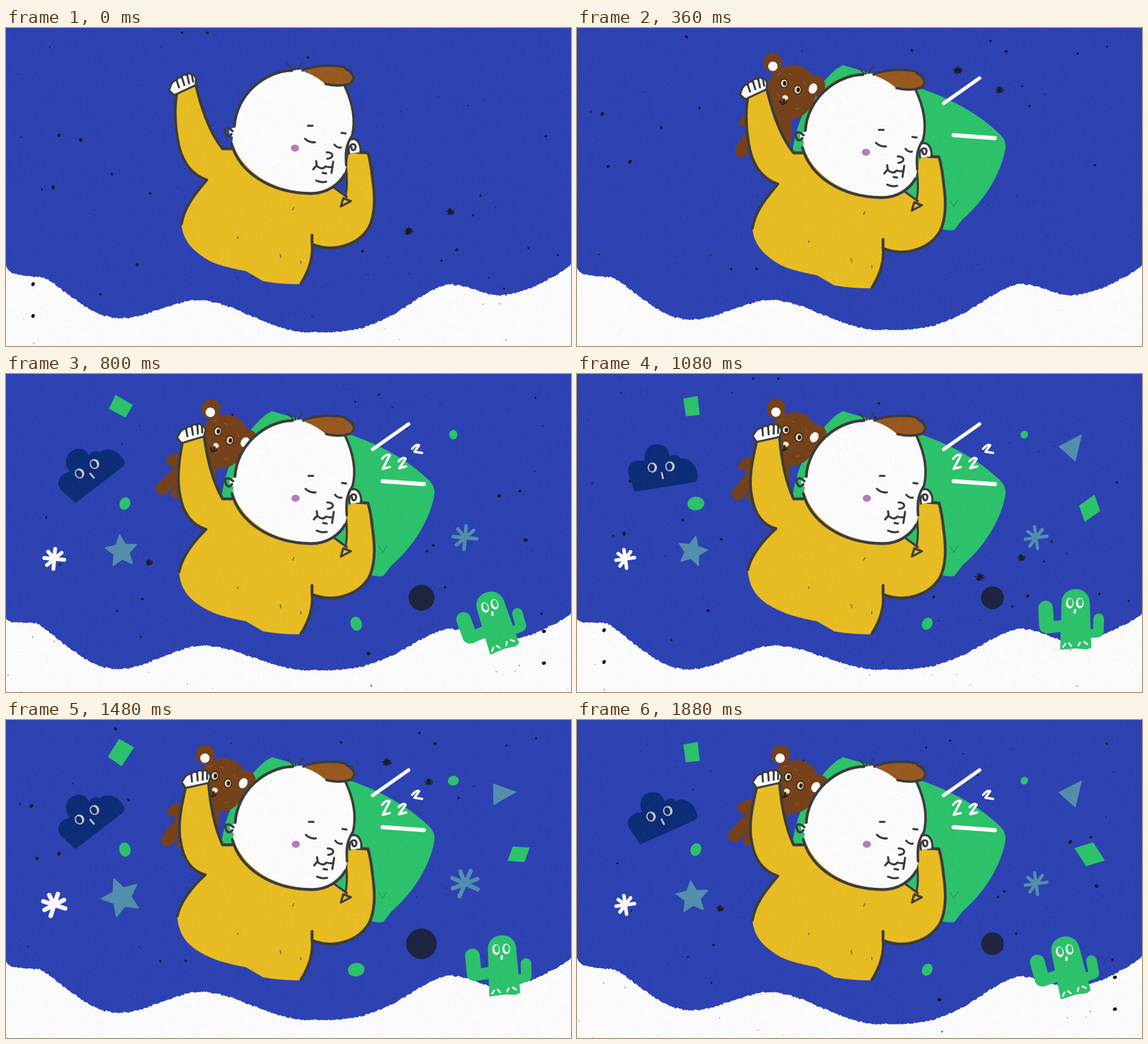
These frames come from a looping animation (960x540 px, 1.92 s). An HTML page with a canvas:

```html
<!DOCTYPE html>
<html lang="en">
<head>
<meta charset="utf-8">
<title>Sleeping baby</title>
<style>
html, body { margin: 0; width: 960px; height: 540px; overflow: hidden; background: #2d42b3; }
canvas { display: block; }
</style>
</head>
<body>
<canvas id="stage" width="960" height="540"></canvas>
<script>
const ctx = document.getElementById('stage').getContext('2d');
const LOOP = 1920, STEP = 40, TAU = Math.PI * 2;
const BLUE = '#2d42b3', WHITE = '#fcfcfc', INK = '#3b3c3b', YELLOW = '#e9bd22', GREEN = '#2cc36b',
  BROWN = '#75411a', HAIR = '#99591f', STEEL = '#538fad', NAVY = '#0c2c78', DARK = '#1d2340', CREAM = '#d0cac8';

const clamp = u => Math.min(1, Math.max(0, u));
const smooth = u => (u = clamp(u), u * u * (3 - 2 * u));
const mix = (a, b, u) => a + (b - a) * u;
const swing = (t, mid, amp, peak) => mid + amp * Math.cos(TAU * (t - peak) / 960);

function seeded(seed) {
  return () => (seed = (seed * 16807) % 2147483647) / 2147483647;
}

// ---------- drawing helpers ----------
function fill(d, color) {
  ctx.fillStyle = color;
  ctx.fill(new Path2D(d));
}
function line(d, width = 4.8, color = INK) {
  ctx.strokeStyle = color;
  ctx.lineWidth = width;
  ctx.stroke(new Path2D(d));
}
function oval(x, y, rx, ry, color, turn = 0) {
  ctx.fillStyle = color;
  ctx.beginPath();
  ctx.ellipse(x, y, rx, ry, turn, 0, TAU);
  ctx.fill();
}
function at(x, y, degrees, scale, draw) {
  if (scale <= 0) return;
  ctx.save();
  ctx.translate(x, y);
  ctx.rotate(degrees * Math.PI / 180);
  ctx.scale(scale, scale);
  draw();
  ctx.restore();
}
// Turn and scale a drawing made in stage coordinates around a pivot.
function around(x, y, degrees, scale, draw) {
  at(x, y, degrees, scale, () => { ctx.translate(-x, -y); draw(); });
}
// Quick scale-in with a little overshoot.
function pop(t, start) {
  const u = clamp((t - start) / 120);
  return u <= 0 ? 0 : u + 0.5 * Math.sin(u * Math.PI) * u;
}

// ---------- paper texture ----------
const rnd = seeded(77);
const edge = Array.from({ length: 481 }, () => (rnd() + rnd() - 1) * 2);

const grain = (() => {
  const tile = document.createElement('canvas');
  tile.width = tile.height = 160;
  const c = tile.getContext('2d'), img = c.createImageData(160, 160);
  for (let i = 0; i < img.data.length; i += 4) {
    img.data[i] = img.data[i + 1] = img.data[i + 2] = rnd() < 0.5 ? 0 : 255;
    img.data[i + 3] = rnd() * 8;
  }
  c.putImageData(img, 0, 0);
  return ctx.createPattern(tile, 'repeat');
})();

function dust(seed, big) {
  const r = seeded(seed), spots = big.map(([x, y, size]) => ({ x, y, size }));
  for (let i = 0; i < 90; i++) spots.push({ x: r() * 960, y: r() * 540, size: 0.5 + 2 * r() ** 4 });
  return spots;
}
const first = dust(4021, [[684, 345, 6], [755, 312, 5], [127, 190, 3.5], [80, 271, 3.5], [90, 182, 3], [513, 50, 2.5],
  [46, 435, 3.5], [46, 489, 3.5], [342, 8, 2.5], [606, 379, 2.5], [766, 377, 3], [223, 402, 3], [180, 248, 2.5], [245, 281, 2.5]]);
const flipped = first.map(s => ({ ...s, x: s.x - 37, y: 417 - s.y }));
const third = dust(9157, [[243, 320, 4.5], [838, 207, 3.5], [883, 282, 3.5], [616, 475, 3.5], [914, 437, 3.5],
  [914, 491, 3.5], [232, 382, 2.5], [873, 199, 2.5], [726, 291, 2.5], [634, 35, 2]]);
const papers = [first, flipped, third];

function drawDust(spots) {
  for (const { x, y, size } of spots) {
    oval(x, y, size, size * 0.8, '#1c1a26', x);
    if (size > 4) for (let i = 0; i < 9; i++)
      oval(x + Math.cos(i * 2.4) * size * 1.2, y + Math.sin(i * 2.4) * size, 1.3, 1, '#1c1a26');
  }
}

// ---------- ground ----------
function drawGround(t) {
  const p = (1 - Math.cos(TAU * (t - 30) / LOOP)) / 2;
  // x, y, and how the slope to the next point is weighted
  const pts = [[0, 405 + 13 * p, 0.6], [62 - 14 * p, 423, 0.72], [195 - 5 * p, 493 + 9 * p, 1], [328 + 10 * p, 462 - p, 0.95],
    [515, 517 - 15 * p, 1.65], [757, 436 - 3 * p, 1], [840, 454, 1.7], [960, 402 + 6 * p]];
  ctx.fillStyle = WHITE;
  ctx.beginPath();
  ctx.moveTo(0, 540);
  for (let x = 0, i = 0; x <= 960; x += 2) {
    while (i < 6 && x > pts[i + 1][0]) i++;
    const [x0, y0, weight] = pts[i], [x1, y1] = pts[i + 1], u = ((x - x0) / (x1 - x0)) ** weight;
    const ease = i === 0 ? 1 - (1 - u) ** 2 : i === 6 ? u : smooth(u);
    ctx.lineTo(x, mix(y0, y1, ease) + edge[x / 2]);
  }
  ctx.lineTo(960, 540);
  ctx.fill();
}

// ---------- small floating shapes ----------
// Eight rays with one gap.
function rays(r, width, color) {
  for (let i = 2; i < 9; i++) {
    const a = i / 8 * TAU, len = r * (i % 2 ? 0.95 : 1);
    line(`M0 0L${Math.cos(a) * len} ${Math.sin(a) * len}`, width, color);
  }
}
function star(r) {
  let d = '';
  for (let i = 0; i < 10; i++) {
    const a = i * Math.PI / 5 - Math.PI / 2, len = i % 2 ? r * 0.48 : r;
    d += (i ? 'L' : 'M') + Math.cos(a) * len + ' ' + Math.sin(a) * len;
  }
  fill(d + 'Z', STEEL);
  line(d + 'Z', 2, STEEL);
}
// Poses are [degrees, scale]; slow shapes run there and back, quick ones go round.
const slow = n => [0, 1, 2, 1][(Math.floor((n - 6) / 10) + 3) % 4];
const quick = n => Math.floor(n / 9) % 3;
const floaters = [
  { x: 195, y: 55, start: 440, beat: slow, poses: [[-62, 1], [-8, 0.95], [32, 1.13]],
    draw: () => fill('M-13-16L13-17L12 17L-13 16Z', GREEN) },
  { x: 82, y: 314, start: 480, beat: slow, poses: [[5, 1], [-8, 0.93], [18, 1.15]], draw: () => rays(17, 6.5, WHITE) },
  { x: 780, y: 278, start: 480, beat: slow, poses: [[5, 1], [-8, 0.93], [24, 1.18]], draw: () => rays(20, 6, STEEL) },
  { x: 706, y: 380, start: 440, beat: slow, poses: [[0, 1], [10, 0.88], [30, 1.18]], draw: () => oval(0, 0, 22, 22, DARK) },
  { x: 595, y: 424, start: 520, beat: slow, poses: [[-15, 1], [30, 0.9], [80, 1.18]], draw: () => oval(0, 0, 9.6, 12, GREEN) },
  { x: 760, y: 103, start: 520, beat: slow, poses: [[0, 1], [40, 0.87], [80, 1.17]], draw: () => oval(0, 0, 7, 8, GREEN) },
  { x: 202, y: 220, start: 440, beat: quick, poses: [[85, 1.2], [-12, 1], [25, 0.93]], draw: () => oval(0, 0, 9.6, 12, GREEN) },
  { x: 196, y: 301, start: 680, beat: quick, poses: [[13, 0.93], [-22, 1.2], [-6, 1]], draw: () => star(28) },
  { x: 841, y: 125, start: 880, beat: slow, poses: [[20, 1], [0, 1], [47, 0.95]],
    draw: () => fill('M-23-2L17-23L6 24Z', STEEL) },
  { x: 871, y: 228, start: 920, beat: quick, poses: [[-35, 1], [4, 0.9], [57, 1.14]],
    draw: () => fill('M-12-14L20-14L12 14L-20 14Z', GREEN) }
];

function drawCloud() {
  fill('M98 200L87 168C84 152 98 144 115 148C112 128 125 118 137 119C150 120 157 128 157 140' +
    'C165 135 174 138 175 144C190 140 206 155 205 178Q204 182 198 184Z', NAVY);
  for (const [x, y] of [[128, 159], [158, 157]]) {
    oval(x, y, 8, 8.5, CREAM);
    oval(x - 1, y, 5, 6.5, NAVY);
  }
  line('M144 168L146 177', 3, CREAM);
}

function drawCactus() {
  fill('M821 468L824 387C826 358 870 358 872 387L874 465L866 468L848 466Z', GREEN);
  line('M797 397L798 427', 25, GREEN);
  line('M799 430L832 427', 20, GREEN);
  line('M887 416L886 438', 18, GREEN);
  line('M885 440L862 442', 15, GREEN);
  for (const x of [838, 855]) {
    oval(x, 389, 6.5, 9, WHITE);
    oval(x + 1, 388, 4, 6.5, GREEN);
  }
  line('M847 401L846 405', 4, WHITE);
  line('M826 463L830 458M836 457L840 462M852 461L855 456M862 455L867 459', 3, WHITE);
}

// ---------- bed ----------
function drawPillow() {
  fill('M452 63C520 85 640 105 716 178Q730 190 728 205C720 250 690 295 655 325L642 342Q638 345 622 342' +
    'L560 300L400 240L366 212C372 160 395 110 440 70Z', GREEN);
  line('M634 293L640 303L647 292', 1.2, '#1c8f5b');
}

function drawTeddy() {
  fill('M300 130L362 150C366 180 364 200 356 212L300 212Z', BROWN);
  oval(292, 156, 17, 11, BROWN, -0.4);
  line('M302 174L279 208', 22, BROWN);
  line('M312 190L303 212', 17, BROWN);
  oval(364, 109, 42, 47, BROWN, 0.4);
  oval(333, 59, 16, 17, BROWN);
  oval(406, 99, 16, 18, BROWN);
  oval(333, 65, 8, 8, WHITE);
  oval(401, 103, 7, 9, WHITE, 0.4);
  for (const [x, y] of [[352, 94], [375, 105]]) {
    oval(x, y, 7, 8, '#2c1a0c');
    oval(x, y, 5.5, 6.5, '#e9dfc6');
    oval(x + 1, y, 3, 4, '#2c1a0c');
  }
  oval(354, 118, 5, 4, '#f1e8d6', 0.3);
  line('M352 121L351 126M345 124L349 130L356 126', 2.5, '#2c1a0c');
  line('M340 80L346 76M385 90L389 96M372 138L378 136M340 110L343 115M360 78L366 80', 1.2, '#93602f');
}

function drawSleepMarks(t) {
  const u = clamp((t - 240) / 100);
  if (u > 0) {
    line(`M623 128L${mix(623, 684, u)} ${mix(128, 85, u)}`, 6, WHITE);
    line(`M640 182L${mix(640, 710, u)} ${mix(182, 187, u)}`, 7, WHITE);
  }
  ['M639 144Q646 135 652 138L640 161L652 158', 'M667 148Q675 140 679 144L668 160L680 157',
    'M690 127Q698 118 702 121L694 132L707 134'].forEach((z, i) => {
    if (t >= 440 + i * 80) line(z, 4, WHITE);
  });
}

// ---------- baby ----------
function drawHand() {
  const shape = 'M-14 18L-23 10L-19-1Q-14-8-10-7Q-9-13-2-12Q1-19 7-16Q11-22 16-16Q21-17 23-9L22 1Z';
  fill(shape, WHITE);
  line(shape, 3.4);
  line('M-10-7L-6 5M-1-12L3 1M8-16L11-2M16-15L18-5', 3.4);
}

function drawBody(reach, pull) {
  const cuffX = 290 + 15 * reach, cuffY = 119 - 4 * reach;
  const sx = 341 + pull * 0.4, sy = 265 + pull * 0.3, wx = 298 + pull, wy = 340 + pull;
  const outer = `C${mix(285, 297, reach)} 150 ${mix(288, 291, reach)} 180 ${294 + 3 * reach} 208C302 240 318 257 ${sx} ${sy}`;
  const waist = `C${325 + pull} ${285 + pull / 2} ${303 + pull} 308 ${wx} ${wy}`;
  const inner = `C${mix(350, 358, reach)} 190 ${mix(335, 348, reach)} 155 ${323 + 21 * reach} 106`;
  const flank = 'C512 424 523 400 520 372';
  const sleeve = 'C560 389 600 374 617 345C629 320 626 285 623 265C621 245 619 232 615 219';
  fill(`M${cuffX} ${cuffY}${outer}${waist}C${301 + pull} 372 ${322 + pull} 388 345 402C365 412 390 416 408 420` +
    `L437 437C460 441 480 442 501 442${flank}${sleeve}L583 220C576 240 580 268 578 293L556 277L500 200L385 212L368 212${inner}Z`, YELLOW);
  line(`M${cuffX} ${cuffY}${outer}`);
  line(`M${sx} ${sy}${waist}`);
  line(`M384 212L368 212${inner}`);
  line(`M501 441${flank}L520 359`);
  line(`M522 375${sleeve}L596 218`);
  line('M577 238C580 260 580 278 577 293M556 277L579 294M569 310L573 296L586 301L571 309', 3.6);
  line('M394 362L394 364M466 392L467 397M501 403L501 407M487 316L489 312', 2, '#77735a');
  at(mix(300, 323, reach), mix(103, 101, reach), 13 * reach, 1, drawHand);
}

function drawHead() {
  fill('M583 220C580 205 584 193 592 195C603 200 605 212 602 218Z', WHITE);
  line('M586 196C598 192 604 208 602 218M583 220C579 205 592 200 594 208C594 217 586 216 587 209', 3.6);
  fill('M496 78C436 77 392 122 389 175L379 180L380 190L386 192C384 196 384 204 388 210C405 248 450 285 518 286' +
    'C552 285 576 266 578 240C580 226 574 216 580 206C594 180 593 140 574 104C550 78 520 76 496 78Z', WHITE);
  line('M385 182C375 173 368 178 373 187C376 193 381 191 383 187', 4);
  line('M486 79C438 80 391 122 388 174M383 203C396 250 446 287 518 288C546 288 566 272 575 256');
  line('M575 104C590 136 594 166 588 190C576 208 577 222 578 240', 4.2);
  fill('M506 81C525 70 552 70 573 73L591 92L585 102C570 106 552 106 541 101C531 92 518 85 506 81Z', HAIR);
  line('M504 79C525 69 555 70 574 73L579 78L586 80L591 92L586 101C570 106 555 105 543 102', 4.2);
  line('M478 67L488 78M490 73L491 78M503 66L495 77', 2.5);
  // face
  oval(491, 211, 7, 6, '#b57bbb');
  line('M513 173L521 173M570 185L577 186M508 195Q515 202 525 201M558 205Q563 211 569 210', 3.5);
  line('M545 218C557 218 558 228 546 229', 3.5);
  line('M527 233L528 240L522 247M528 241Q537 249 543 242Q548 244 555 243M556 234L553 253M538 253L544 254M527 266Q535 270 544 268', 3.5);
}

// ---------- one picture ----------
function draw(t) {
  const n = t / STEP;
  ctx.lineCap = ctx.lineJoin = 'round';
  ctx.fillStyle = BLUE;
  ctx.fillRect(0, 0, 960, 540);
  drawGround(t);
  drawDust(papers[Math.floor(n / 8) % 3]);

  around(146, 170, swing(t, -17.2, -18.6, 660), pop(t, 460), drawCloud);
  around(849, 467, swing(t, -5.5, -13, 780), pop(t, 660), drawCactus);
  for (const f of floaters) {
    const [turn, scale] = f.poses[f.beat(n)];
    at(f.x, f.y, turn, scale * pop(t, f.start), f.draw);
  }

  around(500, 200, 0, pop(t, 80), drawPillow);
  around(340, 135, swing(t, 5.6, 6, 800), pop(t, 160), drawTeddy);
  drawSleepMarks(t);

  const reach = smooth((t - 530) / 450);
  const pull = -8.5 * Math.sin(Math.PI * clamp((t - 600) / 1280));
  ctx.save();
  ctx.translate(0, -7 * (1 - smooth(t / 280)));
  drawBody(reach, pull);
  ctx.translate(1.5 * reach, 0);
  drawHead();
  ctx.restore();

  ctx.fillStyle = grain;
  ctx.fillRect(0, 0, 960, 540);
}

const begin = performance.now();
function tick() {
  const ms = Math.max(0, performance.now() - begin);
  draw(Math.floor(ms / STEP) * STEP % LOOP);
  requestAnimationFrame(tick);
}
tick();
</script>
</body>
</html>
```
